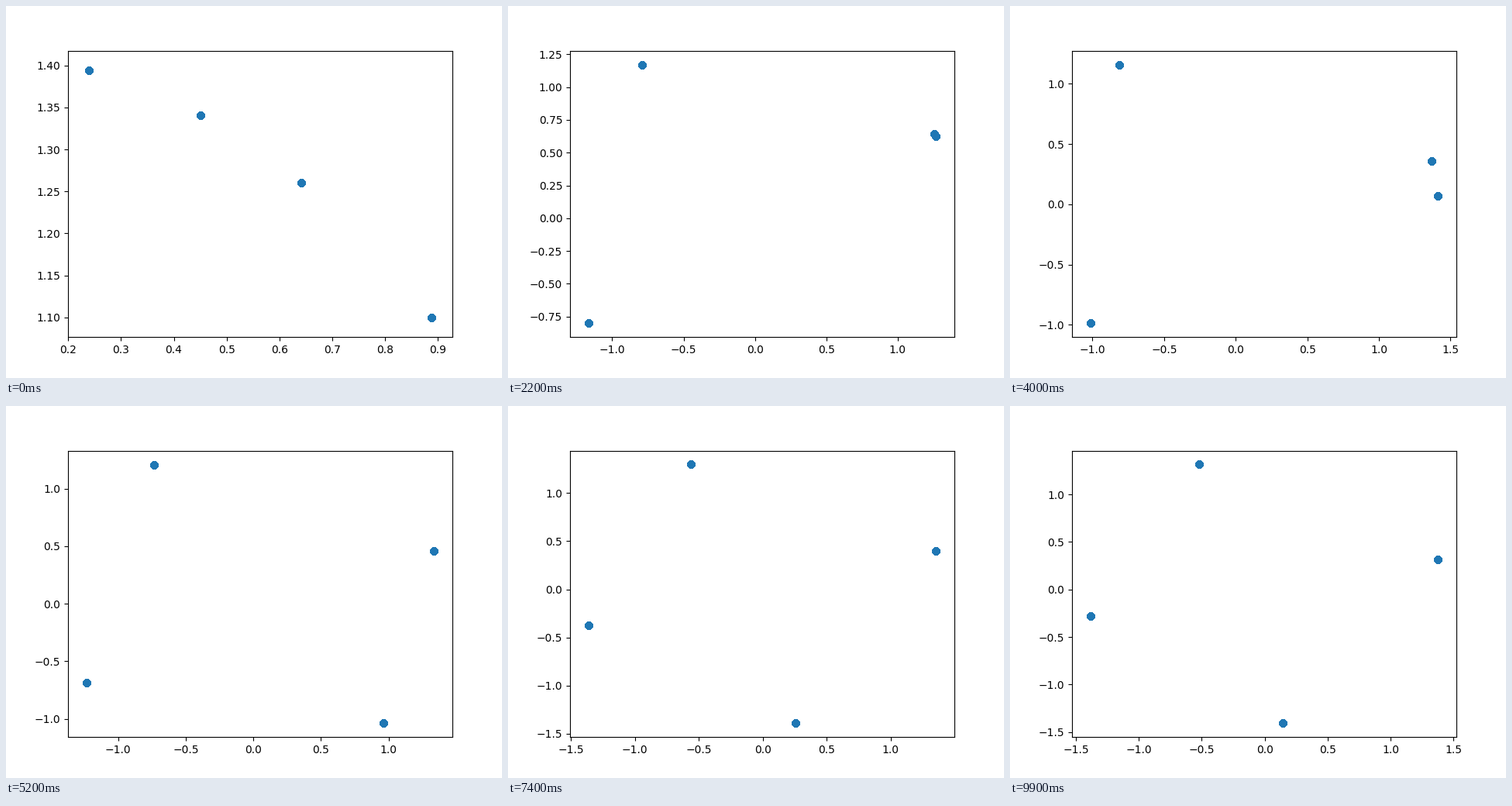
Recreate the animation shown at these times as a matplotlib script. Size 640x480 px, loop 10 s.

```python
import numpy as np
import matplotlib.pyplot as plt
from matplotlib.animation import FuncAnimation

FRAMES, INTERVAL = 100, 100
RADIUS = np.sqrt(2)
COPIES = 250            # stacked markers give the hard dot edge
PAD = np.array([3 / 496, 3 / 369.6])  # marker allowance in the limits

# Key poses: step -> angle in degrees of each of the four points
POSES = {
    0: (80.28, 71.45, 63.0, 51.08),
    6: (150, 104, 51, 41.5),
    14: (205.7, 131.0, 36.95, 31.75),
    22: (214.4, 124.1, 27.2, 26.2),
    40: (224.15, 125.0, 14.67, 2.76),
    48: (214, 122.2, 18, -31),
    64: (197.3, 118.6, 20.7, -82),
    76: (195, 112.5, 15.9, -79),
    84: (194.2, 109.3, 15.6, -76.7),
    99: (191.5, 111.6, 12.9, -84.2),
}


def glide(x, y, t):
    """Cubic Hermite curve through the keys, flat at turning points."""
    slope = np.diff(y) / np.diff(x)
    a, b = slope[:-1], slope[1:]
    inner = np.where(a * b > 0, 2 * a * b / np.where(a + b == 0, 1, a + b), 0)
    m = np.concatenate([slope[:1], inner, slope[-1:]])
    i = np.clip(np.searchsorted(x, t, "right") - 1, 0, len(x) - 2)
    h = x[i + 1] - x[i]
    s = (t - x[i]) / h
    return ((1 + 2 * s) * (1 - s) ** 2 * y[i] + s * (1 - s) ** 2 * h * m[i]
            + s * s * (3 - 2 * s) * y[i + 1] + s * s * (s - 1) * h * m[i + 1])


keys = np.array(list(POSES), float)
steps = np.arange(FRAMES)
angles = np.radians([glide(keys, np.array(a, float), steps)
                     for a in zip(*POSES.values())])
paths = RADIUS * np.stack([np.cos(angles), np.sin(angles)], axis=-1)

fig, ax = plt.subplots(figsize=(6.4, 4.8), dpi=100)
dots = ax.scatter(np.zeros(4 * COPIES), np.zeros(4 * COPIES), color="C0")


def update(n):
    pts = paths[:, n]
    lo, hi = pts.min(axis=0) - PAD, pts.max(axis=0) + PAD
    margin = 0.05 * (hi - lo)
    (x0, y0), (x1, y1) = lo - margin, hi + margin
    ax.set_xlim(x0, x1)
    ax.set_ylim(y0, y1)
    dots.set_offsets(np.tile(pts, (COPIES, 1)))
    return [dots]


anim = FuncAnimation(fig, update, frames=FRAMES, interval=INTERVAL,
                     init_func=lambda: update(0), repeat=True, repeat_delay=0)
plt.show()
```
